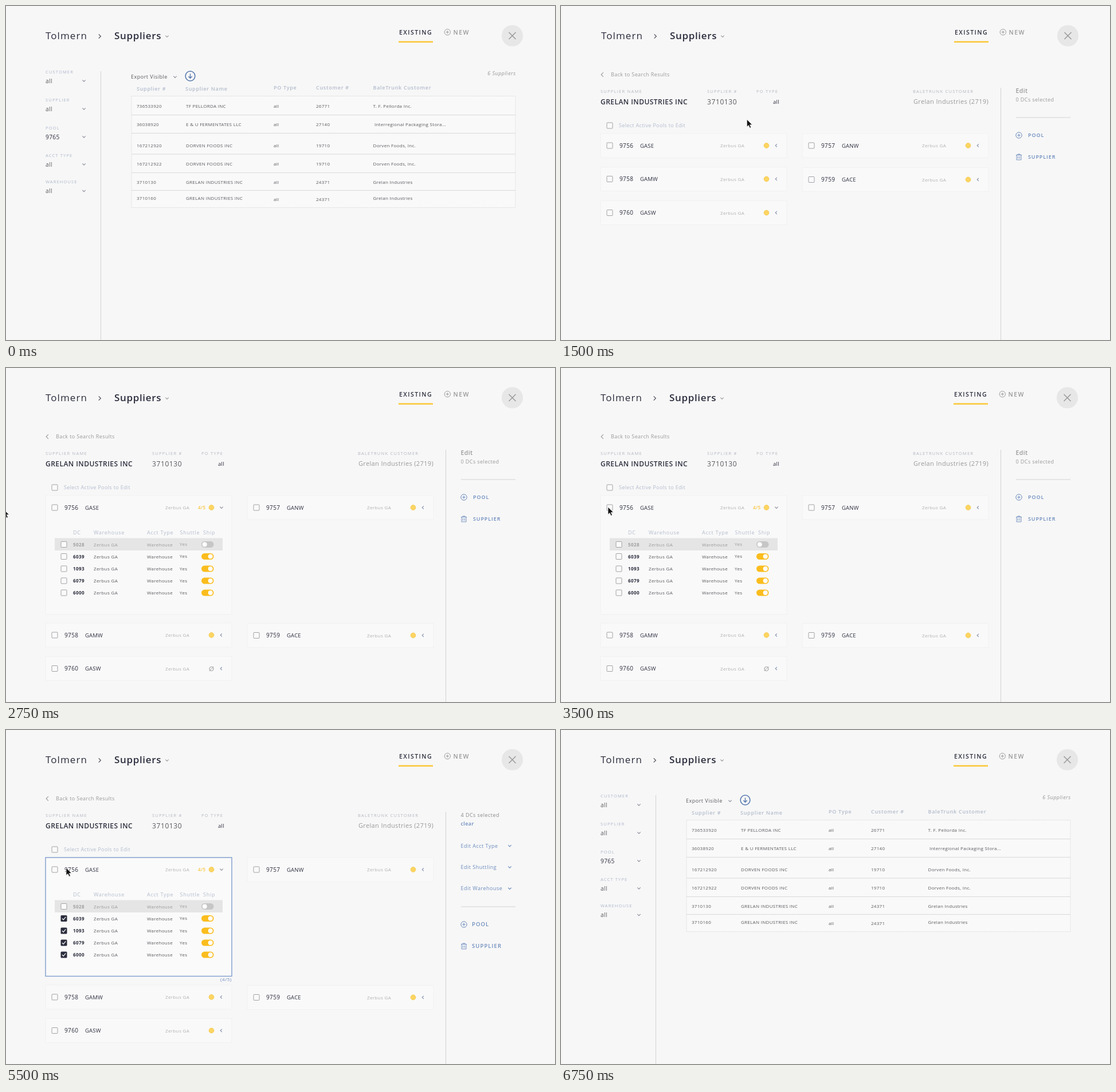
Write an HTML page that moves like this. It is 958 by 584 pixels and loops after 7.25 s.

```html
<!DOCTYPE html>
<html lang="en">
<head>
<meta charset="utf-8">
<title>Supplier pools</title>
<style>
  html, body { margin: 0; width: 100%; height: 100%; overflow: hidden; background: #f7f7f7; }
  svg { display: block; width: 100%; height: 100%; }
  text { font-family: "Open Sans", "Noto Sans", sans-serif; white-space: pre; }
</style>
</head>
<body>
<svg id="stage" viewBox="0 0 958 584"></svg>
<script>
const INK = '#2b2d3d', TEXT = '#5a5a60', GRAY = '#999', PALE = '#b3bccd', LABEL = '#b4b7c2',
      BLUE = '#6a8abd', YELLOW = '#fbbd1e', RULE = '#d2d2d2';
const STEP = 250, LOOP = 7250;
const timed = [];

// ---- drawing helpers ----
const text = (x, y, s, size, fill, gap = 0, weight = 400, extra = '') =>
  `<text x="${x}" y="${y}" font-size="${size}" fill="${fill}" letter-spacing="${gap}" font-weight="${weight}" ${extra}>${s.replace(/&/g, '&amp;')}</text>`;
const rect = (x, y, w, h, fill, extra = '') =>
  `<rect x="${x}" y="${y}" width="${w}" height="${h}" fill="${fill}" ${extra}/>`;
const stroke = (d, color, width = 1, extra = '') =>
  `<path d="${d}" fill="none" stroke="${color}" stroke-width="${width}" ${extra}/>`;
const circle = (x, y, r, fill, line = 'none', width = 1) =>
  `<circle cx="${x}" cy="${y}" r="${r}" fill="${fill}" stroke="${line}" stroke-width="${width}"/>`;
const chevron = (x, y, turn = 0, color = '#8b8f9b', s = 2.7, width = 1.1) =>
  stroke(`M${-s} ${-s / 2}L0 ${s / 2}L${s} ${-s / 2}`, color, width, `transform="translate(${x} ${y}) rotate(${turn})"`);
const label = (x, y, s) => text(x, y, s, 7.5, LABEL, 1.25);
const small = (x, y, s, fill = TEXT, gap = .3, weight = 400) => text(x, y, s, 8, fill, gap, weight);
const columnHead = (x, y, s, weight = 600) => text(x, y, s, 9, PALE, .72, weight);
const plus = (x, y, color) => circle(x, y, 5.2, 'none', color) +
  stroke(`M${x - 2.7} ${y}h5.4M${x} ${y - 2.7}v5.4`, color);
const trash = (x, y, color) => stroke(`M${x - 5} ${y - 3.5}h10M${x - 2} ${y - 3.5}v-1.5h4v1.5` +
  `M${x - 4} ${y - 3.5}v8.5h8v-8.5M${x - 1.5} ${y - 1.5}v4.5M${x + 1.5} ${y - 1.5}v4.5`, color, .9);
const box = (x, y, checked) => checked
  ? rect(x - 5.5, y - 5.5, 11, 11, INK, 'rx="1.5"') + stroke(`M${x - 3} ${y}l2.2 2.4L${x + 3.2} ${y - 2.6}`, '#fff', 1.2)
  : rect(x - 5, y - 5, 10, 10, '#fafafa', 'stroke="#a2a2a8" rx="1"');
const toggle = (y, on) => rect(341, y - 5.5, 21.5, 11, on ? YELLOW : '#c6c6c6', 'rx="5.5"') +
  circle(on ? 356.7 : 346.7, y, 4, '#fff');

// Shows markup from step a up to, but not including, each b of the given pairs.
const during = (spans, markup) => {
  timed.push(spans);
  return `<g class="timed">${markup}</g>`;
};

// ---- header ----
const header = `<g id="header">` +
  text(69, 58, 'Tolmern', 17, INK, 1.05) + chevron(163.5, 53, -90, '#55565f', 3.6, 1.3) +
  text(189, 58, 'Suppliers', 17, INK, .65, 600) + chevron(281, 53, 0, GRAY) +
  text(686, 49.7, 'EXISTING', 10.5, INK, 1.45, 600) + rect(685, 61.5, 60, 2.4, '#fbc62f') +
  plus(770.3, 45.7, GRAY) + text(780.5, 49.7, 'NEW', 10.5, GRAY, 1.45, 600) +
  circle(883.5, 52, 18.6, '#e7e7e7') + stroke('M877.5 46l12 12m0-12l-12 12', GRAY, 1.5) + `</g>`;

// ---- list view ----
const filters = [['CUSTOMER', 'all', 117.5], ['SUPPLIER', 'all', 166.5], ['POOL', '9765', 215.5],
  ['ACCT TYPE', 'all', 263.5], ['WAREHOUSE', 'all', 310]];
const rows = [
  [178.3, '736533920', 'TF PELLORDA INC', '26771', 'T. F. Pellorda Inc.'],
  [209.5, '36038920', 'E & U FERMENTATES LLC', '27140', ' Interregional Packaging Stora...'],
  [247, '167212920', 'DORVEN FOODS INC', '19710', 'Dorven Foods, Inc.'],
  [278.7, '167212922', 'DORVEN FOODS INC', '19710', 'Dorven Foods, Inc.'],
  [311, '3710130', 'GRELAN INDUSTRIES INC', '24371', 'Grelan Industries'],
  [339, '3710160', 'GRELAN INDUSTRIES INC', '24371', 'Grelan Industries']];
const listRow = ([y, id, name, customer, company], i, fill = TEXT) => {
  const sag = i === 5 ? 2 : 0;
  return small(228, y, id, fill) + small(314, y, name, fill) + small(467, y + sag, 'all', fill) +
    small(541, y + sag, customer, fill) + small(640.5, y, company, fill);
};
const list =
  filters.map(([name, value, y]) => text(69, y, name, 7.5, '#adb7ca', 1.15) +
    text(69, y + 17, value, 10.2, value === 'all' ? TEXT : INK, .35) + chevron(136, y + 13.3)).join('') +
  stroke('M165.5 114V584', RULE) +
  text(218, 126.5, 'Export Visible', 9, TEXT, .5) + chevron(295, 124) +
  circle(321.5, 122.5, 8.4, 'none', '#5577ad', 1.5) +
  stroke('M321.5 118.5v7.5m-3.2-3l3.2 3.2l3.2-3.2', '#5577ad', 1.4) +
  text(889.5, 120.5, '6 Suppliers', 9, GRAY, .5, 400, 'font-style="italic" text-anchor="end"') +
  columnHead(228, 147.5, 'Supplier #') + columnHead(313, 147.5, 'Supplier Name') +
  columnHead(467, 146, 'PO Type') + columnHead(541, 146, 'Customer #') + columnHead(640.5, 146, 'BaleTrunk Customer') +
  rect(219, 157.5, 670, 195, '#f9f9f9', 'stroke="#dedede" stroke-dasharray="2 1"') +
  during([[2, 6]], rect(219.5, 158, 669, 32, '#fff')) +
  [190.5, 222.5, 259, 291.5, 322.5].map(y => stroke(`M219 ${y}H889`, '#d9d9d9')).join('') +
  rows.slice(1).map((row, i) => listRow(row, i + 1)).join('') +
  during([[0, 3], [26, 29]], listRow(rows[0], 0)) +
  during([[3, 6]], listRow(rows[0], 0, '#9c9c9c'));

// ---- detail view ----
const poolLine = (x, y, id, code) => text(x + 33, y + 3.6, id, 10, INK, .35) +
  text(x + 69, y + 3.6, code, 9.5, INK, .2) + small(x + 209, y + 3, 'Zerbus GA', '#b0b0b3', .35);
const dot = (x, y) => circle(x + 289.5, y, 4.4, '#fcd562', '#f3c64c', .8);
const noDot = (x, y) => circle(x + 289.5, y, 3.6, 'none', GRAY) + stroke(`M${x + 285.5} ${y + 4}l8-8`, GRAY, .9);
const frame = (x, y, h, extra = 'stroke="#f1f1f2"') => rect(x, y, 325, h, '#f9f9f9', extra);
const card = (x, y, id, code, mark = dot(x, y)) => frame(x, y - 21, 42) + box(x + 16, y) +
  poolLine(x, y, id, code) + mark + chevron(x + 306.5, y, 90, '#8490ab');
const ratio = small(335, 247, '4/5', '#f8c53e', .4, 600);

const detail =
  chevron(72, 120, 90, GRAY, 3.8) + text(87, 123, 'Back to Search Results', 9, GRAY, .4) +
  label(69, 151.5, 'SUPPLIER NAME') + label(255, 151.5, 'SUPPLIER #') + label(341, 151.5, 'PO TYPE') +
  label(614, 151.5, 'BALETRUNK CUSTOMER') +
  text(69, 171.5, 'GRELAN INDUSTRIES INC', 12, INK, .45, 600) + text(255, 171.5, '3710130', 12, TEXT, .6) +
  text(370, 170.5, 'all', 9.5, INK, .3) +
  text(746, 171, 'Grelan Industries (2719)', 11, GRAY, .35, 400, 'text-anchor="end"') +
  box(85, 209) + text(101, 212.2, 'Select Active Pools to Edit', 9, PALE, .35) +
  stroke('M767.5 143V584', RULE) + card(421, 244, '9757', 'GANW');

const collapsed =
  during([[6, 8]], card(69, 244, '9756', 'GASE')) +
  during([[8, 10]], rect(68.5, 224.5, 326, 42, '#000', 'opacity=".18" filter="url(#soft)"') +
    rect(69, 223, 325, 42, '#fdfdfd', 'stroke="#d0d0d0" stroke-width=".8"') + box(85, 244) +
    poolLine(69, 244, '9756', 'GASE') + ratio + dot(69, 244) + chevron(375.5, 244, 90, '#8490ab') +
    trash(405, 244, GRAY)) +
  card(69, 302.5, '9758', 'GAMW') + card(421, 303.5, '9759', 'GACE') + card(69, 361.5, '9760', 'GASW');

const centers = [['5028', 308.5], ['6039', 329.5], ['1093', 351], ['6079', 372], ['6000', 393]];
const centerRow = ([id, y], i) => {
  const tone = i ? TEXT : GRAY;
  return small(117, y + 3, id, i ? INK : '#a0a0a0', .45, 700) + small(153, y + 3, 'Zerbus GA', tone, .35) +
    small(246, y + 3, 'Warehouse', tone) + small(303, y + 2.7, 'Yes', tone) + toggle(y, i > 0);
};
const boxes = from => box(85, 244, from === 0) +
  centers.map(([, y], i) => box(101, y, i >= from)).join('');

const expanded =
  frame(69, 223, 207.5) +
  during([[15, 26]], rect(69, 223, 325, 207.5, '#fafafa', 'stroke="#7f9dcd" stroke-width="1.4"')) +
  poolLine(69, 244, '9756', 'GASE') + ratio + dot(69, 244) + chevron(376, 244) +
  [[117, 'DC'], [153, 'Warehouse'], [246, 'Acct Type'], [303.5, 'Shuttle'], [344, 'Ship']]
    .map(([x, s]) => columnHead(x, 291, s, 400)).join('') +
  rect(85, 297.5, 293, 21.5, '#e5e5e5') + centers.map(centerRow).join('') +
  during([[10, 15]], boxes(5)) +
  during([[15, 19]], boxes(0) + small(374, 439, '(5/5)', BLUE, .6)) +
  during([[19, 26]], boxes(1) + small(374, 439, '(4/5)', BLUE, .6)) +
  card(69, 467, '9758', 'GAMW') + card(421, 467.5, '9759', 'GACE') +
  card(69, 525.5, '9760', 'GASW', during([[10, 19]], noDot(69, 526)) + during([[19, 26]], dot(69, 525.5)));

// ---- side panel ----
const actions = (x, y, size, gap) => stroke(`M794 ${y - 31}H889`, RULE) +
  plus(799, y, BLUE) + text(x, y + 3.4, 'POOL', size, BLUE, gap, 600) +
  trash(799, y + 38, BLUE) + text(x, y + 41.2, 'SUPPLIER', size, BLUE, gap, 600);
const idlePanel = text(793.5, 151.7, 'Edit', 10.5, GRAY, .4, 600) +
  text(793.5, 167, '0 DCs selected', 9, GRAY, .42) + actions(815, 226, 9, .9);
const selected = n => text(793.5, 151.5, n + ' DCs selected', 9, '#8a8a8e', .45);
const editPanel = during([[15, 19]], selected(5)) + during([[19, 26]], selected(4)) +
  text(793.5, 167.3, 'clear', 9, BLUE, .4, 600) +
  ['Acct Type', 'Shuttling', 'Warehouse'].map((s, i) =>
    text(793.5, 205.5 + i * 37.3, 'Edit ' + s, 9, BLUE, .5) + chevron(879, 202.5 + i * 37.3, 0, BLUE)).join('') +
  actions(813, 340, 9.5, 1.1);

const stage = document.getElementById('stage');
// Nested groups register before their parents, so spans follow the markup's post-order.
stage.innerHTML = '<defs><filter id="soft"><feGaussianBlur stdDeviation="1.6"/></filter></defs>' + header;
const addScene = (spans, build) => {
  const g = document.createElementNS('http://www.w3.org/2000/svg', 'g');
  g.innerHTML = build;
  stage.append(g);
  return { g, spans };
};
const parts = timed.map(spans => ({ spans }));
const scenes = [
  addScene([[0, 6], [26, 29]], list),
  addScene([[6, 26]], detail),
  addScene([[6, 10]], collapsed),
  addScene([[10, 26]], expanded),
  addScene([[6, 15]], idlePanel),
  addScene([[15, 26]], editPanel)
];
stage.querySelectorAll('.timed').forEach((g, i) => parts[i].g = g);
const cursor = addScene([[1, 6], [6, 12], [13, 26]],
  '<path d="M0 0V13.2L3 10.4L5.2 15.2L7.4 14.2L5.3 9.6H9.4Z" fill="#111" stroke="#fff" stroke-width=".7"/>');

// Pointer stops: [step, x, y]; between stops it glides one step at a time.
const stops = [[1, 844, 150], [3, 402, 177.5], [5, 402, 177.5], [8, 169, 239.5], [9, 166, 240],
  [11, -4, 247], [12, -14, 248], [13, 20, 247], [14, 82, 243], [15, 83, 243], [18, 97, 309],
  [19, 97, 309], [22, 105, 241], [24, 101, 120], [25, 101, 120]];
const pointerAt = step => {
  const i = Math.max(1, stops.findIndex(s => s[0] >= step));
  const [a, ax, ay] = stops[i - 1], [b, bx, by] = stops[i];
  const k = (step - a) / (b - a);
  return [ax + (bx - ax) * k, ay + (by - ay) * k];
};

const all = [...scenes, ...parts, cursor];
let shown = -1;
function draw(now) {
  const step = Math.floor((now % LOOP) / STEP);
  if (step !== shown) {
    shown = step;
    for (const { g, spans } of all)
      g.style.display = spans.some(([a, b]) => step >= a && step < b) ? '' : 'none';
    document.getElementById('header').setAttribute('transform', `translate(${step >= 6 && step < 10 ? 1 : 0} 0)`);
    cursor.g.setAttribute('transform', `translate(${pointerAt(step)})`);
  }
}
const start = performance.now();
function tick() {
  draw(performance.now() - start);
  requestAnimationFrame(tick);
}
tick();
</script>
</body>
</html>
```
